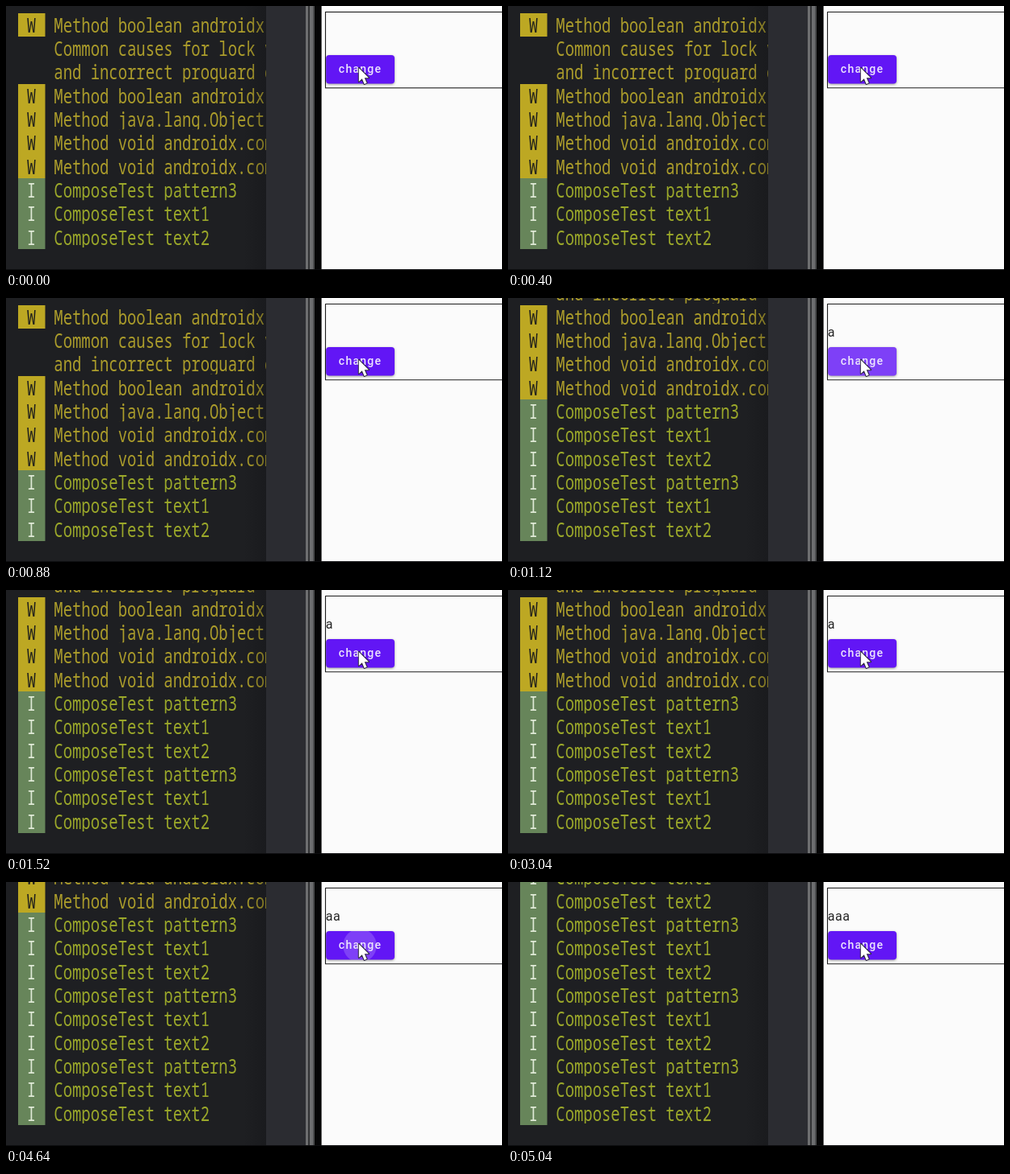
Animation, 614 px wide and 328 px high, one loop 5760 ms. Source, as an HTML page with a canvas:

```html
<!DOCTYPE html>
<html lang="en">
<head>
<meta charset="utf-8">
<title>Log and button</title>
<style>
html, body { margin: 0; width: 100%; height: 100%; overflow: hidden; background: #1e1f22; }
canvas { display: block; width: 614px; height: 328px; }
</style>
</head>
<body>
<canvas id="stage"></canvas>
<script>
const W = 614, H = 328, LOOP = 5760, STEP = 80;
const canvas = document.getElementById("stage");
const ctx = canvas.getContext("2d");
const dpr = window.devicePixelRatio || 1;
canvas.width = W * dpr;
canvas.height = H * dpr;

const ROW = 29.33, TOP = 8.6, LOG_RIGHT = 322, VISIBLE = 10;
const BASELINE = 24.2, TEXT_CUT = 27.4;
const CONDENSE = 0.771;
const LOG_FONT = '24.5px "Noto Sans Mono", "DejaVu Sans Mono", monospace';
const LEVELS = {
  W: { tag: "#bda823", letter: "#1f1f1c", text: "#ab9c2b" },
  I: { tag: "#67855a", letter: "#dfe9d6", text: "#9ba82a" }
};
const PRESSES = [960, 3200, 4640];

const voidCall = ["W", "Method void androidx.compose"];
const composed = ["pattern3", "text1", "text2"].map(s => ["I", "ComposeTest " + s]);
const log = [
  ["W", "Method boolean androidx.compose"],
  ["", "Common causes for lock verification"],
  ["", "and incorrect proguard optimizations"],
  ["W", "Method boolean androidx.compose"],
  ["W", "Method java.lang.Object"],
  voidCall, voidCall,
  ...composed, ...composed, ...composed, ...composed
];

function rect(color, x, y, w, h) {
  ctx.fillStyle = color;
  ctx.fillRect(x, y, w, h);
}

function label(text, x, y, font, color, spacing) {
  ctx.font = font;
  ctx.letterSpacing = spacing;
  ctx.fillStyle = color;
  ctx.fillText(text, x, y);
}

function logText(text, x, y, color, align) {
  ctx.save();
  ctx.translate(x, y);
  ctx.scale(CONDENSE, 1);
  ctx.textAlign = align;
  label(text, 0, 0, LOG_FONT, color, "0px");
  ctx.restore();
}

function drawRow([level, text], y) {
  const style = LEVELS[level || "W"];
  if (level) {
    const top = Math.round(y);
    rect(style.tag, 15, top, 33.5, Math.round(y + ROW) - top);
    logText(level, 31.5, y + BASELINE, style.letter, "center");
  }
  // each row cuts off its descenders
  ctx.save();
  ctx.beginPath();
  ctx.rect(0, y, LOG_RIGHT, TEXT_CUT);
  ctx.clip();
  logText(text, 59.3, y + BASELINE, style.text, "left");
  ctx.restore();
}

function drawLog(clicks) {
  rect("#1e1f22", 0, 0, LOG_RIGHT, H);
  const first = clicks * 3;
  for (let i = Math.max(0, first - 1); i < first + VISIBLE; i++) {
    drawRow(log[i], TOP + (i - first) * ROW);
  }
  const shade = ctx.createLinearGradient(294, 0, LOG_RIGHT, 0);
  shade.addColorStop(0, "rgba(16,17,20,0)");
  shade.addColorStop(1, "rgba(16,17,20,0.3)");
  rect(shade, 294, 0, LOG_RIGHT - 294, H);
}

function drawDivider() {
  rect("#2b2c31", LOG_RIGHT, 0, 371 - LOG_RIGHT, H);
  rect("#6d6e70", 371, 0, 3, H);
  rect("#323335", 374, 0, 2, H);
  rect("#6d6e70", 376, 0, 4, H);
  rect("#4a4b4d", 380, 0, 2, H);
  rect("#050506", 382, 0, 9, H);
}

function drawRipple(age) {
  if (age < 0 || age >= 320) return;
  const grow = Math.min(1, (age + 80) / 200);
  const fade = Math.min(1, (320 - age) / 160);
  ctx.fillStyle = `rgba(255,255,255,${0.18 * fade})`;
  ctx.beginPath();
  ctx.arc(438, 79, 52 * grow, 0, Math.PI * 2);
  ctx.fill();
}

function drawButton(t) {
  ctx.save();
  ctx.beginPath();
  ctx.roundRect(396.2, 61, 84.8, 35.5, 4);
  ctx.shadowColor = "rgba(0,0,0,0.4)";
  ctx.shadowBlur = 3 * dpr;
  ctx.shadowOffsetY = dpr;
  ctx.fillStyle = "#6216f5";
  ctx.fill();
  ctx.shadowColor = "transparent";
  ctx.clip();
  PRESSES.forEach(p => drawRipple(t - p));
  ctx.restore();
  label("change", 411.8, 83.3, '500 14px Roboto, sans-serif', "#ece4fd", "1.25px");
}

function drawCursor() {
  const points = [[0, 0], [0, 17], [4, 13.3], [6.8, 20], [9.8, 18.7], [7, 12.2], [12.2, 12.2]];
  ctx.beginPath();
  points.forEach(([x, y]) => ctx.lineTo(436.8 + x, 77 + y));
  ctx.closePath();
  ctx.lineJoin = "round";
  ctx.lineWidth = 2;
  ctx.strokeStyle = "#29233d";
  ctx.stroke();
  ctx.fillStyle = "#ffffff";
  ctx.fill();
}

function drawPhone(t, clicks) {
  rect("#fbfbfb", 390.6, 0, W - 390.6, H);
  ctx.strokeStyle = "#1c1c1c";
  ctx.lineWidth = 1.1;
  ctx.strokeRect(395.5, 7.5, 230, 94.3);
  label("a".repeat(clicks), 395.8, 48.3, '16px Roboto, sans-serif', "#242424", "0.5px");
  drawButton(t);
  drawCursor();
}

function draw(now) {
  const t = Math.floor((now % LOOP) / STEP) * STEP;
  const clicks = PRESSES.filter(p => t >= p + STEP).length;
  ctx.setTransform(dpr, 0, 0, dpr, 0, 0);
  ctx.textBaseline = "alphabetic";
  drawLog(clicks);
  drawDivider();
  drawPhone(t, clicks);
  rect("#0c0c0e", 0, 327, W, 1);
}

let start;
function tick(now) {
  if (start === undefined) start = now;
  draw(now - start);
  requestAnimationFrame(tick);
}
requestAnimationFrame(tick);
</script>
</body>
</html>
```
